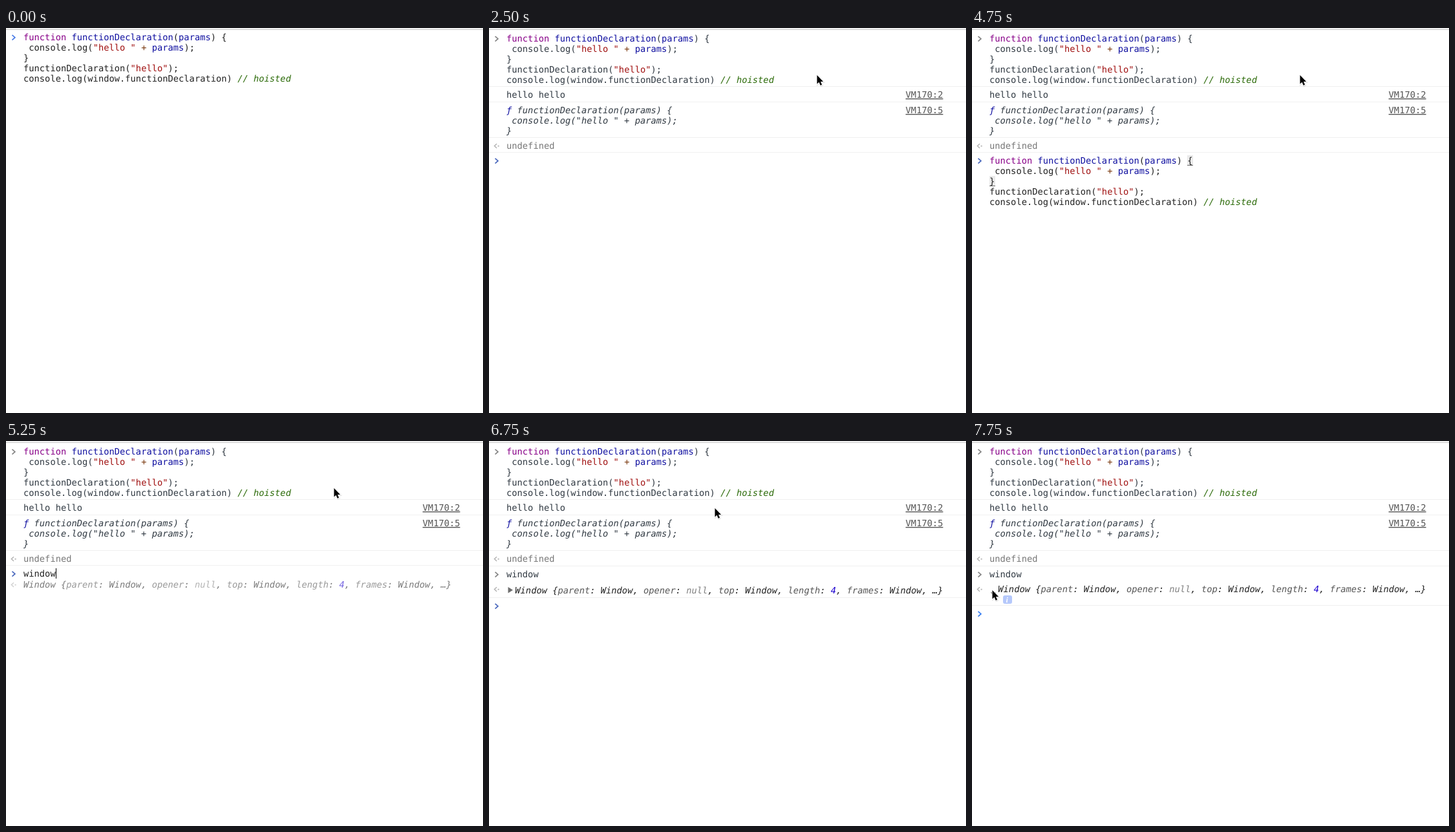
These frames come from a looping animation (738 by 596 pixels, 8000 ms). An HTML page:

```html
<!DOCTYPE html>
<html lang="en">
<head>
<meta charset="utf-8">
<title>Console</title>
<style>
  html, body { margin: 0; width: 100%; height: 100%; overflow: hidden; background: #fff; }
  svg { display: block; }
  text { font: 13.75px "DejaVu Sans Mono", monospace; white-space: pre; text-rendering: geometricPrecision; fill: #222; }
  .out { fill: #303942; }
  .key { fill: #880088; }
  .def { fill: #1010a0; }
  .str { fill: #a01010; }
  .op { fill: #7a3a10; }
  .com { fill: #2b6a08; }
  .it, .com { font-style: italic; }
  .prop { fill: #565656; }
  .nil { fill: #808080; }
  .num { fill: #1c00cf; }
  .undef { fill: #777; }
  .link { fill: #545454; text-decoration: underline; }
</style>
</head>
<body>
<svg id="stage" width="738" height="596" viewBox="0 0 738 596" xml:space="preserve"></svg>
<script>
const stage = document.getElementById('stage');
const STEP = 250, STEPS = 32, LEFT = 27, CHAR = 8.28, LINE = 16;

const span = (cls, s) => `<tspan class="${cls}">${s}</tspan>`;
const text = (x, top, s, cls = '') => `<text x="${x}" y="${top + 13}" class="${cls}">${s}</text>`;
const lines = (top, list, cls) => list.map((s, i) => text(LEFT, top + i * LINE, s, cls)).join('');
const rect = (x, y, w, h, fill) => `<rect x="${x}" y="${y}" width="${w}" height="${h}" fill="${fill}"/>`;
const rule = y => rect(0, y, 738, 1, '#f0f0f0');
const caret = (x, top) => rect(x, top, 1, LINE, '#000');
const path = (d, attrs) => `<path d="${d}" ${attrs}/>`;
const chevron = (top, color) =>
  path(`M9.5 ${top + 4.8}l4.4 3.9-4.4 3.9`, `fill="none" stroke="${color}" stroke-width="1.7"`);
const resultIcon = top =>
  path(`M12 ${top + 5.2}l-3.6 3.4 3.6 3.4`, 'fill="none" stroke="#b0b0b0" stroke-width="1.4"') +
  rect(13.6, top + 7.8, 2, 1.8, '#b0b0b0');

const CODE = [
  `${span('key', 'function')} ${span('def', 'functionDeclaration')}(${span('def', 'params')}) {`,
  ` console.log(${span('str', '"hello "')} ${span('op', '+')} ${span('def', 'params')});`,
  '}',
  `functionDeclaration(${span('str', '"hello"')});`,
  `console.log(window.functionDeclaration) ${span('com', '// hoisted')}`
];
const FUNCTION = [
  `${span('def', 'ƒ')} functionDeclaration(params) {`,
  ' console.log("hello " + params);',
  '}'
];
const WINDOW = 'Window {' + [
  ['parent', 'Window'], ['opener', span('nil', 'null')], ['top', 'Window'],
  ['length', span('num', '4')], ['frames', 'Window']
].map(([name, value]) => `${span('prop', name)}: ${value}, `).join('') + '…}';

const BLUE = '#4a7be6', DARK_BLUE = '#4a68bd', BRIGHT_BLUE = '#367cf1', GRAY = '#858585';

// [first step, x, y]
const POINTER = [[1, 566, 8], [2, 517, 66], [4, 507, 72], [27, 349, 103], [28, 76, 226], [29, 31, 230]];
// [first step, last step, x, top]
const CARETS = [
  [3, 4, 383, 70], [7, 7, 383, 70],
  [8, 9, 27, 197], [12, 13, 27, 197], [16, 16, 27, 197],
  [17, 18, 342, 197], [21, 22, 77, 197],
  [24, 24, 27, 221], [25, 25, 27, 247], [29, 29, 27, 247]
];

const brace = (x, top) => rect(x, top, 9, LINE, '#eaeaea') + rect(x, top + 15, 9, 1, '#666');

function history(step) {
  return chevron(8, GRAY) + lines(8, CODE, 'out') + rule(90) +
    text(LEFT, 95, 'hello hello', 'out') + text(644.6, 95, 'VM170:2', 'link') + rule(114) +
    lines(119, FUNCTION, 'out it') + text(644.6, 119, 'VM170:5', 'link') + rule(169) +
    resultIcon(174) + text(LEFT, 174, 'undefined', 'undef') + rule(step < 24 ? 192 : 193);
}

function prompt(step) {
  if (step < 17) return chevron(197, DARK_BLUE);
  if (step < 21) {
    return chevron(197, DARK_BLUE) + brace(333, 197) + brace(27, 229) + lines(197, CODE);
  }
  if (step < 24) {
    return chevron(197, DARK_BLUE) + text(LEFT, 197, 'window') +
      `<g opacity=".6">${resultIcon(214)}${text(LEFT, 214, WINDOW, 'it')}</g>`;
  }
  const command = chevron(198, GRAY) + text(LEFT, 198, 'window', 'out');
  if (step < 25) return command + rule(216) + chevron(221, BRIGHT_BLUE);
  const open = step === 31;
  return command + resultIcon(221) + text(40.3, open ? 221 : 223, WINDOW, 'it') +
    (open
      ? path('M29 234h8l-4 7z', 'fill="#6e6e6e"') +
        '<rect x="48" y="239" width="14" height="13" rx="3" fill="#b5c8fb"/>' +
        '<text x="52.4" y="250" style="font:italic bold 12px \'Liberation Serif\',serif;fill:#fff">i</text>' +
        rule(254) + chevron(259, BRIGHT_BLUE)
      : path('M29.5 226v9.5l7.5-4.75z', 'fill="#6e6e6e"') +
        rule(242) + chevron(247, step < 30 ? DARK_BLUE : BRIGHT_BLUE));
}

function pointer(step) {
  const at = POINTER.filter(p => p[0] <= step).pop();
  if (!at) return '';
  const arrow = 'M0 0V13.6L3.1 10.8 5.2 15.8 7.6 14.8 5.5 9.9H9.6Z';
  return `<g transform="translate(${at[1] + 0.5} ${at[2] + 1})">` +
    path(arrow, 'transform="translate(.6 1)" fill="none" stroke="#000" stroke-opacity=".12" stroke-width="2"') +
    path(arrow, 'fill="#000" stroke="#fff" stroke-width="1.6" paint-order="stroke"') + '</g>';
}

function draw(step) {
  const toolbar = rect(0, 0, 738, 2, '#f3f3f3') + rect(0, 2, 738, 1, '#ccc');
  const content = step < 8 ? chevron(6, BLUE) + lines(6, CODE) : history(step) + prompt(step);
  const blink = CARETS.filter(c => c[0] <= step && step <= c[1]).map(c => caret(c[2], c[3])).join('');
  stage.innerHTML = toolbar + content + blink + pointer(step);
}

let shown = -1;
const start = performance.now();
function tick() {
  const step = Math.floor((performance.now() - start) / STEP) % STEPS;
  if (step !== shown) draw(shown = step);
  requestAnimationFrame(tick);
}
tick();
</script>
</body>
</html>
```
